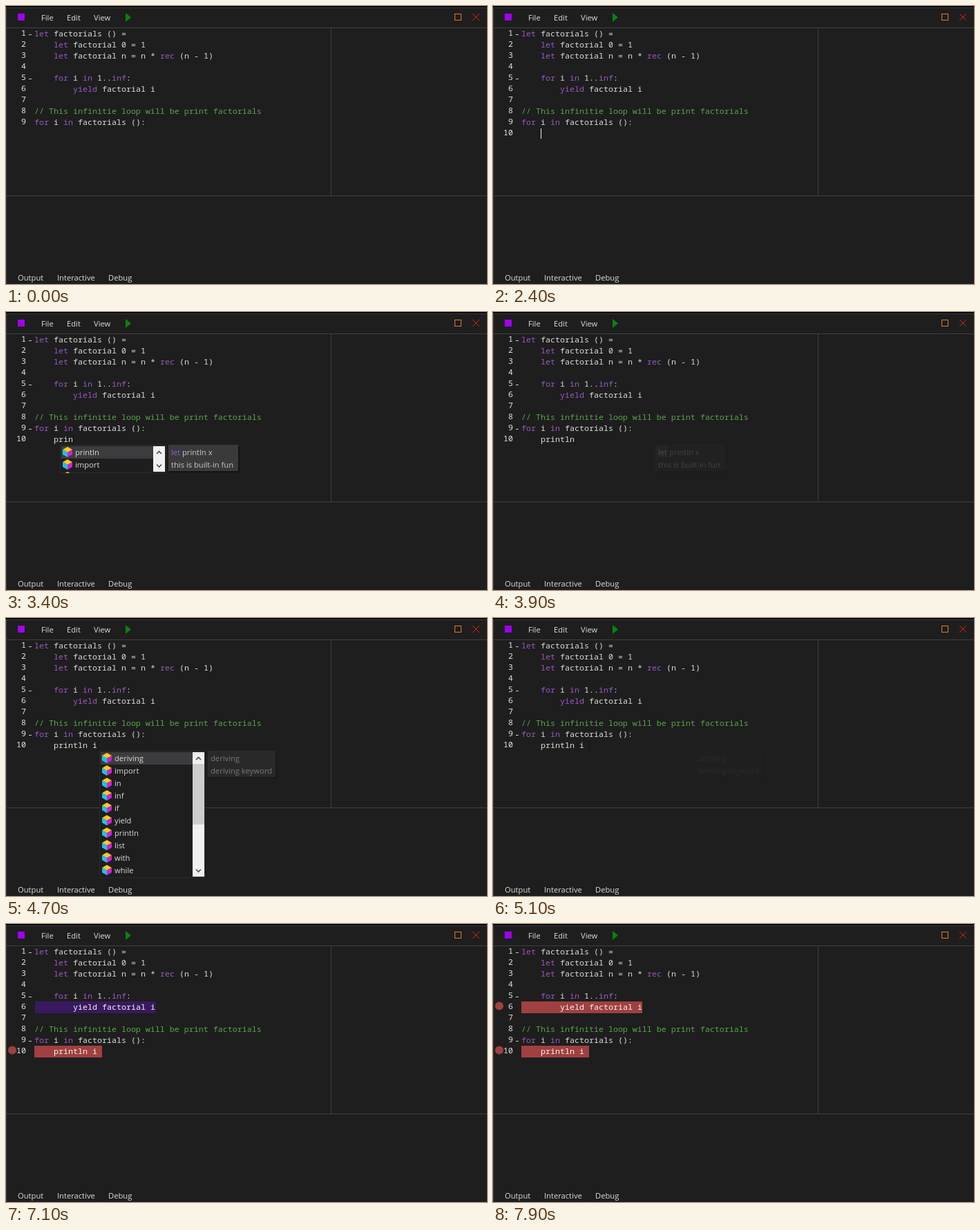
Animation, 696 px wide and 402 px high, one loop 8000 ms. Source, as an HTML page with a canvas:

```html
<!DOCTYPE html>
<html lang="en">
<head>
<meta charset="utf-8">
<title>Code editor</title>
<style>
  html, body { margin: 0; width: 100%; height: 100%; overflow: hidden; background: #1e1e1e; }
  canvas { display: block; }
</style>
</head>
<body>
<canvas id="stage" width="696" height="402"></canvas>
<script>
const ctx = document.getElementById('stage').getContext('2d');
const LOOP = 8000, CHAR = 7, LEFT = 41, ROW = 16;
const MONO = '11.667px "Noto Sans Mono", monospace';
const UI = '11.2px "Open Sans", sans-serif';
const BG = '#1e1e1e', LINE = '#3f3f41', TEXT = '#dcdcdc', KEYWORD = '#9b59c0', COMMENT = '#57a64a', RED = '#a04040';

const SOURCE = [
  'let factorials () =',
  '    let factorial 0 = 1',
  '    let factorial n = n * rec (n - 1)',
  '',
  '    for i in 1..inf:',
  '        yield factorial i',
  '',
  '// This infinitie loop will be print factorials',
  'for i in factorials ():'
];

// [time, text of line 10]
const TYPING = [[1500, ''], [1900, '    '], [2500, '    p'], [2700, '    pr'], [3000, '    pri'],
  [3300, '    prin'], [3500, '    print'], [3700, '    println'], [4200, '    println '],
  [4600, '    println i'], [4900, '    println i ']];

const within = (t, from, to) => t >= from && t < to;
const latest = (steps, t) => steps.filter(([time]) => time <= t).pop();
const rowTop = n => 33 + (n - 1) * ROW;

function rect(x, y, w, h, color) {
  ctx.fillStyle = color;
  ctx.fillRect(x, y, w, h);
}

function stroke(color, width, ...points) {
  ctx.strokeStyle = color;
  ctx.lineWidth = width;
  ctx.beginPath();
  points.forEach(([x, y]) => ctx.lineTo(x, y));
  ctx.stroke();
}

function polygon(color, ...points) {
  ctx.fillStyle = color;
  ctx.beginPath();
  points.forEach(([x, y]) => ctx.lineTo(x, y));
  ctx.fill();
}

function text(string, x, y, color = TEXT, font = UI) {
  ctx.font = font;
  ctx.fillStyle = color;
  ctx.fillText(string, x, y);
}

function drawWindow() {
  rect(0, 0, 696, 402, BG);
  rect(0, 0, 696, 2, '#000');
  rect(0, 2, 696, 1, LINE);
  rect(0, 2, 1, 400, LINE);
  rect(0, 31, 696, 1, LINE);
  rect(470, 31, 1, 244, LINE);
  rect(0, 274, 696, 1, LINE);

  rect(17, 11, 10, 10, '#a000f0');
  [['File', 51], ['Edit', 88], ['View', 127]].forEach(([s, x]) => text(s, x, 21));
  [['Output', 17], ['Interactive', 74], ['Debug', 148]].forEach(([s, x]) => text(s, x, 397));
  polygon('#088212', [173, 10], [181, 16.5], [173, 23]);
  ctx.strokeStyle = '#e07a2c';
  ctx.lineWidth = 1;
  ctx.strokeRect(649.5, 11.5, 9, 9);
  stroke('#e02020', 1, [675, 11], [685, 21]);
  stroke('#e02020', 1, [685, 11], [675, 21]);
}

function drawCode(line, n, plain) {
  const y = rowTop(n) + 11;
  const parts = line.startsWith('//') ? [line] : line.split(/\b(let|rec|for|in|inf|yield)\b/);
  let column = 0;
  parts.forEach((part, i) => {
    const color = plain ? '#f4f4f4' : line.startsWith('//') ? COMMENT : i % 2 ? KEYWORD : TEXT;
    const indent = part.length - part.trimStart().length;
    text(part.trim(), LEFT + (column + indent) * CHAR, y, color, MONO);
    column += part.length;
  });
}

function drawMark(n, columns, marked, selected) {
  const y = rowTop(n) - 1;
  if (marked) {
    rect(LEFT, y, columns * CHAR, 17, RED);
    ctx.fillStyle = RED;
    ctx.beginPath();
    ctx.arc(9, y + 6.5, 6, 0, Math.PI * 2);
    ctx.fill();
  }
  if (selected) rect(LEFT + 1, y, columns * CHAR, 17, 'rgba(84,20,160,.5)');
}

function drawEditor(t) {
  const typed = latest(TYPING, t);
  const lines = typed ? [...SOURCE, typed[1]] : SOURCE;
  drawMark(6, 25, t >= 7300, within(t, 7000, 7700));
  drawMark(10, 14, t >= 6400, within(t, 6300, 7000));

  lines.forEach((line, i) => {
    const n = i + 1;
    const plain = n === 6 && t >= 7000 || n === 10 && t >= 6300;
    drawCode(line, n, plain);
    text(String(n), 29 - CHAR * String(n).length, rowTop(n) + 10, '#e4e4e4', MONO);
  });
  [1, 5, 9].forEach(n => {
    if (n < 9 || t >= 2500) rect(33, rowTop(n) + 8, 4, 1, '#c8c8c8');
  });

  const caretRow = typed ? 10 : 9;
  const caretColumn = t >= 6300 ? 0 : lines[caretRow - 1].length;
  const lit = within(t, 500, 1000) || within(t, 2400, 2500) || within(t, 5500, 6000);
  if (t < 7000) rect(LEFT + caretColumn * CHAR, rowTop(caretRow), 1, 15, lit ? '#f0f0f0' : '#141414');
}

function drawCube(x, y) {
  polygon('#ffc81e', [x + 7, y], [x + 14, y + 4], [x + 7, y + 8], [x, y + 4]);
  polygon('#18c4e8', [x, y + 4], [x + 7, y + 8], [x + 7, y + 15], [x, y + 11]);
  polygon('#d020d8', [x + 14, y + 4], [x + 7, y + 8], [x + 7, y + 15], [x + 14, y + 11]);
}

function drawList(x, items, height) {
  const y = 192, bottom = y + height;
  ctx.save();
  ctx.beginPath();
  ctx.rect(x, y, 153, height);
  ctx.clip();
  rect(x, y, 153, height, '#2b2b2b');
  rect(x + 1, y + 1, 151, height - 2, BG);
  rect(x + 2, y + 2, 133, 18, '#3c3c3e');
  items.forEach((item, i) => {
    drawCube(x + 4, y + 3 + i * 18);
    text(item, x + 22, y + 15 + i * 18);
  });
  rect(x + 135, y + 2, 17, height - 4, '#f0f0f0');
  if (height > 60) rect(x + 135, y + 19, 17, (height - 38) * .6, '#cdcdcd');
  const cx = x + 143.5;
  stroke('#505050', 1.6, [cx - 3.5, y + 13], [cx, y + 9.5], [cx + 3.5, y + 13]);
  stroke('#505050', 1.6, [cx - 3.5, bottom - 12.5], [cx, bottom - 9], [cx + 3.5, bottom - 12.5]);
  ctx.restore();
}

function drawTip(x, width, title, detail, alpha) {
  ctx.globalAlpha = Math.max(0, Math.min(1, alpha));
  rect(x + 2, 194, width, 38, 'rgba(0,0,0,.35)');
  rect(x, 192, width, 38, '#3a3a3b');
  const isLet = title.startsWith('let ');
  text(title, x + 4, 207, '#c8c8c8');
  if (isLet) {
    rect(x + 2, 194, 15, 16, '#3a3a3b');
    text('let', x + 4, 207, KEYWORD);
  }
  text(detail, x + 4, 225, '#c8c8c8');
  ctx.globalAlpha = 1;
}

function drawCompletion(t) {
  if (within(t, 2600, 2700)) drawList(78, ['import', 'println', 'input', 'open', 'loop'], 95);
  if (within(t, 2700, 3000)) drawList(78, ['import', 'println', 'input'], 41);
  if (within(t, 3000, 3700)) drawList(78, ['println', 'import', 'input'], 41);
  if (within(t, 4700, 4900)) {
    drawList(135, ['deriving', 'import', 'in', 'inf', 'if', 'yield', 'println', 'list', 'with', 'while'], 184);
  }

  if (within(t, 2600, 3000)) drawTip(235, 93, 'import', 'import keyword', (t - 2500) / 200);
  if (within(t, 3000, 4000)) drawTip(235, 101, 'let println x', 'this is built-in fun', 1 - (t - 3700) / 250);
  if (within(t, 4700, 5500)) {
    const alpha = t < 4900 ? (t - 4600) / 200 : Math.max(.08, 1 - (t - 4900) / 217);
    drawTip(292, 98, 'deriving', 'deriving keyword', alpha);
  }
}

function frame(now) {
  const t = Math.floor(now % LOOP / 100) * 100;
  drawWindow();
  drawEditor(t);
  drawCompletion(t);
  requestAnimationFrame(frame);
}
requestAnimationFrame(frame);
</script>
</body>
</html>
```
